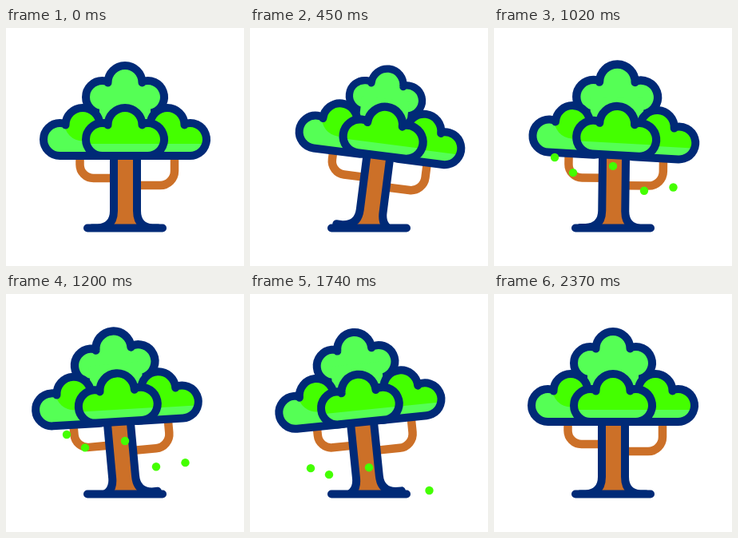
Animation of 298x298 px, one loop 3.6 s. Source, as an HTML page with a canvas:

```html
<!DOCTYPE html>
<html lang="en">
<head>
<meta charset="utf-8">
<title>Swaying tree</title>
<style>
  html, body { margin: 0; width: 100%; height: 100%; overflow: hidden; background: #fff; }
  canvas { display: block; width: 100vw; height: 100vh; }
</style>
</head>
<body>
<canvas id="stage" width="298" height="298"></canvas>
<script>
const ctx = document.getElementById('stage').getContext('2d');
const LOOP = 3600, STEP = 30;
const NAVY = '#002a77', LIGHT = '#55ff55', GREEN = '#44ff00', BROWN = '#cc7028';
const LINE = 10;

// x, time and height of a known point, speed, first and last moment
const leaves = [
  [76, 1020, 162, 0.078, 870, 2220],
  [99, 810, 168, 0.0625, 600, 2250],
  [149, 810, 160, 0.0615, 720, 2370],
  [188, 810, 189, 0.07, 570, 1680],
  [224.5, 810, 186, 0.0645, 600, 1830]
];

const ease = p => (1 - Math.cos(Math.PI * p)) / 2;
const arch = (t, from, to) =>
  t > from && t < to ? Math.sin(Math.PI * (t - from) / (to - from)) : 0;

// Lean of the tree in degrees
function lean(t) {
  if (t < 600) return 10 * ease(Math.pow(t / 600, 1.5));
  if (t < 1450) return 10 - 19 * ease((t - 600) / 850);
  if (t < 2160) return -9 * (1 - ease((t - 1450) / 710));
  return 0;
}

function rotated(deg, y, draw) {
  ctx.save();
  ctx.translate(149, y);
  ctx.rotate(deg * Math.PI / 180);
  ctx.translate(-149, -y);
  draw();
  ctx.restore();
}

function stroke(color, width) {
  ctx.strokeStyle = color;
  ctx.lineWidth = width;
  ctx.stroke();
}

// Top of the outline at y = 0, bottom at y = 70
function cloudPath() {
  const q = Math.PI / 2, tip = 1.22;
  ctx.beginPath();
  ctx.moveTo(28.5, 65);
  ctx.lineTo(-28.5, 65);
  ctx.arc(-28.5, 44.5, 20.5, q, Math.PI * 2 - tip);
  ctx.arc(0, 26.5, 21.5, Math.PI, 0);
  ctx.arc(28.5, 44.5, 20.5, Math.PI + tip, q + Math.PI * 2);
  ctx.closePath();
}

function cloud(x, y, base, shade, scale = 1, skirt = 0) {
  ctx.save();
  ctx.translate(x, y + 45);
  ctx.scale(scale, scale);
  ctx.translate(0, -45);
  cloudPath();
  ctx.fillStyle = base;
  ctx.fill();
  if (shade) {
    ctx.save();
    ctx.clip();
    shade();
    ctx.restore();
  }
  cloudPath();
  stroke(NAVY, LINE);
  ctx.fillStyle = base;
  ctx.fillRect(-32, 45, 64, skirt);
  ctx.restore();
}

function lowerBand() {
  ctx.fillStyle = LIGHT;
  ctx.fillRect(-60, 50, 120, 30);
}

function upperPatch() {
  ctx.fillStyle = GREEN;
  ctx.beginPath();
  ctx.arc(0, 23.5, 23, 0, Math.PI * 2);
  ctx.rect(0, 0, 60, 46.5);
  ctx.fill();
}

function branches() {
  ctx.lineCap = 'butt';
  ctx.beginPath();
  ctx.moveTo(92.5, 155);
  ctx.lineTo(92.5, 171);
  ctx.arcTo(92.5, 188, 110, 188, 17);
  ctx.lineTo(136, 188);
  ctx.moveTo(211, 155);
  ctx.lineTo(211, 179);
  ctx.arcTo(211, 197, 193, 197, 18);
  ctx.lineTo(163, 197);
  stroke(BROWN, 10.5);
}

function trunk() {
  ctx.lineCap = 'round';
  ctx.beginPath();
  ctx.moveTo(108, 250.5);
  ctx.lineTo(115, 250.5);
  ctx.quadraticCurveTo(135, 249, 135, 229);
  ctx.lineTo(135, 152);
  ctx.lineTo(164, 152);
  ctx.lineTo(164, 229);
  ctx.quadraticCurveTo(164, 249, 183, 250.5);
  ctx.lineTo(190, 250.5);
  ctx.fillStyle = BROWN;
  ctx.fill();
  stroke(NAVY, LINE);
}

function ground() {
  ctx.lineCap = 'round';
  ctx.beginPath();
  ctx.moveTo(102, 250.5);
  ctx.lineTo(196, 250.5);
  stroke(NAVY, LINE);
}

function fallingLeaves(t) {
  ctx.fillStyle = GREEN;
  for (const [x, t0, y0, speed, from, to] of leaves) {
    if (t < from || t >= to) continue;
    ctx.beginPath();
    ctx.arc(x, Math.min(249, y0 + speed * (t - t0)), 5.2, 0, Math.PI * 2);
    ctx.fill();
  }
}

function draw(t) {
  const deg = lean(t);
  const lead = arch(t, 0, 1350), squash = arch(t, 0, 780), swell = arch(t, 750, 1350);
  ctx.fillStyle = '#fff';
  ctx.fillRect(0, 0, 298, 298);
  ctx.lineJoin = 'round';

  // Nothing of the swinging trunk shows below the ground line
  ctx.save();
  ctx.beginPath();
  ctx.rect(0, 0, 298, 251);
  ctx.clip();
  rotated(deg, 250, () => {
    branches();
    trunk();
  });
  ctx.restore();

  rotated(deg > 0 ? deg * 0.93 : deg, 250, () =>
    cloud(149 + 2 * lead + 2 * swell, 42, LIGHT, null,
      1 - 0.07 * squash * squash + 0.04 * swell, 45));
  rotated(deg, 250, () => rotated(2.5 * swell, 140, () => {
    cloud(96, 95, LIGHT, upperPatch);
    cloud(202, 95, GREEN, lowerBand);
    cloud(149 + 4 * lead, 95 - 2 * lead, GREEN, lowerBand, 1 + 0.03 * lead);
  }));
  fallingLeaves(t);
  ground();
}

const start = performance.now();
function tick() {
  const t = (performance.now() - start) % LOOP;
  draw(Math.floor(t / STEP) * STEP);
  requestAnimationFrame(tick);
}
tick();
</script>
</body>
</html>
```
